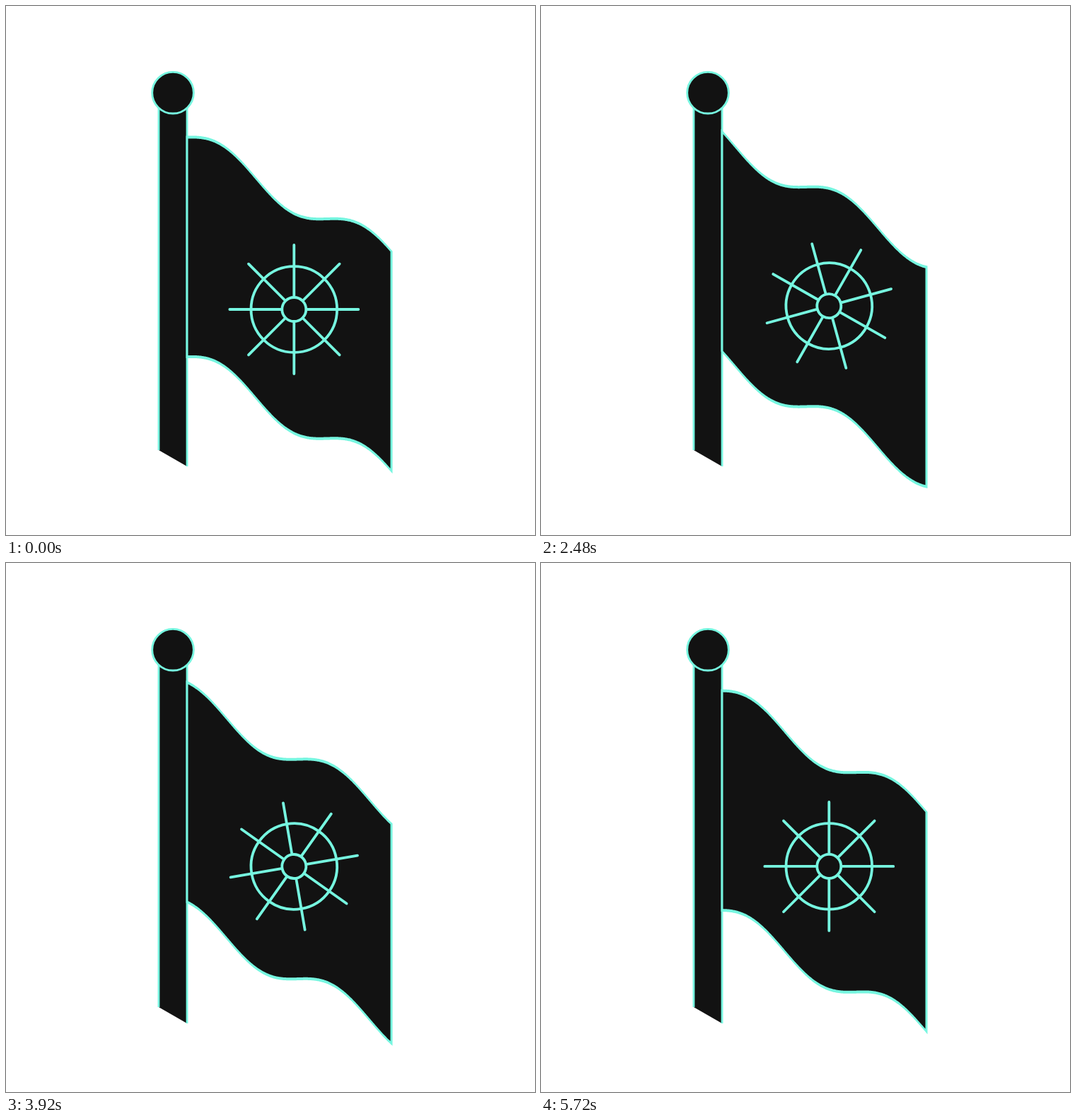
Write an HTML page with a canvas that moves like this. It is 748x748 px and loops after 5760 ms.

```html
<!DOCTYPE html>
<html>
<head>
<meta charset="utf-8">
<style>
html, body { margin: 0; width: 100%; height: 100%; overflow: hidden; background: #fff; }
canvas { display: block; }
</style>
</head>
<body>
<canvas id="stage" width="748" height="748"></canvas>
<script>
const ctx = document.getElementById('stage').getContext('2d');
const LOOP = 5760, STEP = 40, TAU = Math.PI * 2;
const DARK = '#121212', MINT = '#76f6e0';

// Smooth 0..1 ramp between two times
function ease(t, from, to) {
  const u = Math.min(1, Math.max(0, (t - from) / (to - from)));
  return u * u * (3 - 2 * u);
}

function circle(x, y, r, width) {
  ctx.lineWidth = width;
  ctx.beginPath();
  ctx.arc(x, y, r, 0, TAU);
  ctx.fill();
  ctx.stroke();
}

function drawPole() {
  ctx.fillStyle = DARK;
  ctx.strokeStyle = MINT;
  ctx.lineWidth = 2.8;
  ctx.beginPath();
  ctx.moveTo(216, 123);
  ctx.lineTo(256, 123);
  ctx.lineTo(256, 651);
  ctx.lineTo(216, 628);
  ctx.fill();
  ctx.beginPath();
  ctx.moveTo(216, 123);
  ctx.lineTo(216, 628);
  ctx.moveTo(256, 123);
  ctx.lineTo(256, 651);
  ctx.stroke();
  circle(236, 122.7, 29.3, 2.8);
}

// The flag's slanted top edge with a travelling sine
function edge(x, cycles) {
  return 188.5 + 0.571 * (x - 257) - 19.4 * Math.sin(TAU * ((x - 454) / 202 - cycles));
}

function fillFlag(cycles, left, right, inset, color) {
  ctx.fillStyle = color;
  ctx.beginPath();
  for (let x = left; x <= right; x++) ctx.lineTo(x, edge(x, cycles) + inset);
  for (let x = right; x >= left; x--) ctx.lineTo(x, edge(x, cycles) + 310.5 - inset);
  ctx.fill();
}

function drawWheel(y, angle) {
  ctx.save();
  ctx.translate(407.3, y);
  ctx.rotate(angle);
  ctx.fillStyle = DARK;
  ctx.strokeStyle = MINT;
  ctx.lineCap = 'round';
  circle(0, 0, 60.8, 3.8);
  ctx.beginPath();
  for (let i = 0; i < 8; i++) {
    const c = Math.cos(i * TAU / 8), s = Math.sin(i * TAU / 8);
    ctx.moveTo(17 * c, 17 * s);
    ctx.lineTo(91 * c, 91 * s);
  }
  ctx.stroke();
  circle(0, 0, 17, 3.8);
  ctx.restore();
}

function draw(t) {
  ctx.fillStyle = '#fff';
  ctx.fillRect(0, 0, 748, 748);
  drawPole();

  // Steady wind with one gust while the wheel spins
  const cycles = 6.06 * t / LOOP + 0.94 * ease(t, 2520, 4680);
  fillFlag(cycles, 254.5, 546.5, -2, MINT);
  fillFlag(cycles, 257.5, 543.5, 2, DARK);

  const bob = t > 2880 && t < 4800 ? 1 : Math.cos(TAU * t / 960);
  drawWheel(426.4 + 2.6 * bob, TAU * ease(t, 2040, 4534));
}

const start = performance.now();
function tick() {
  const t = (performance.now() - start) % LOOP;
  draw(Math.floor(t / STEP) * STEP);
  requestAnimationFrame(tick);
}
tick();
</script>
</body>
</html>
```
